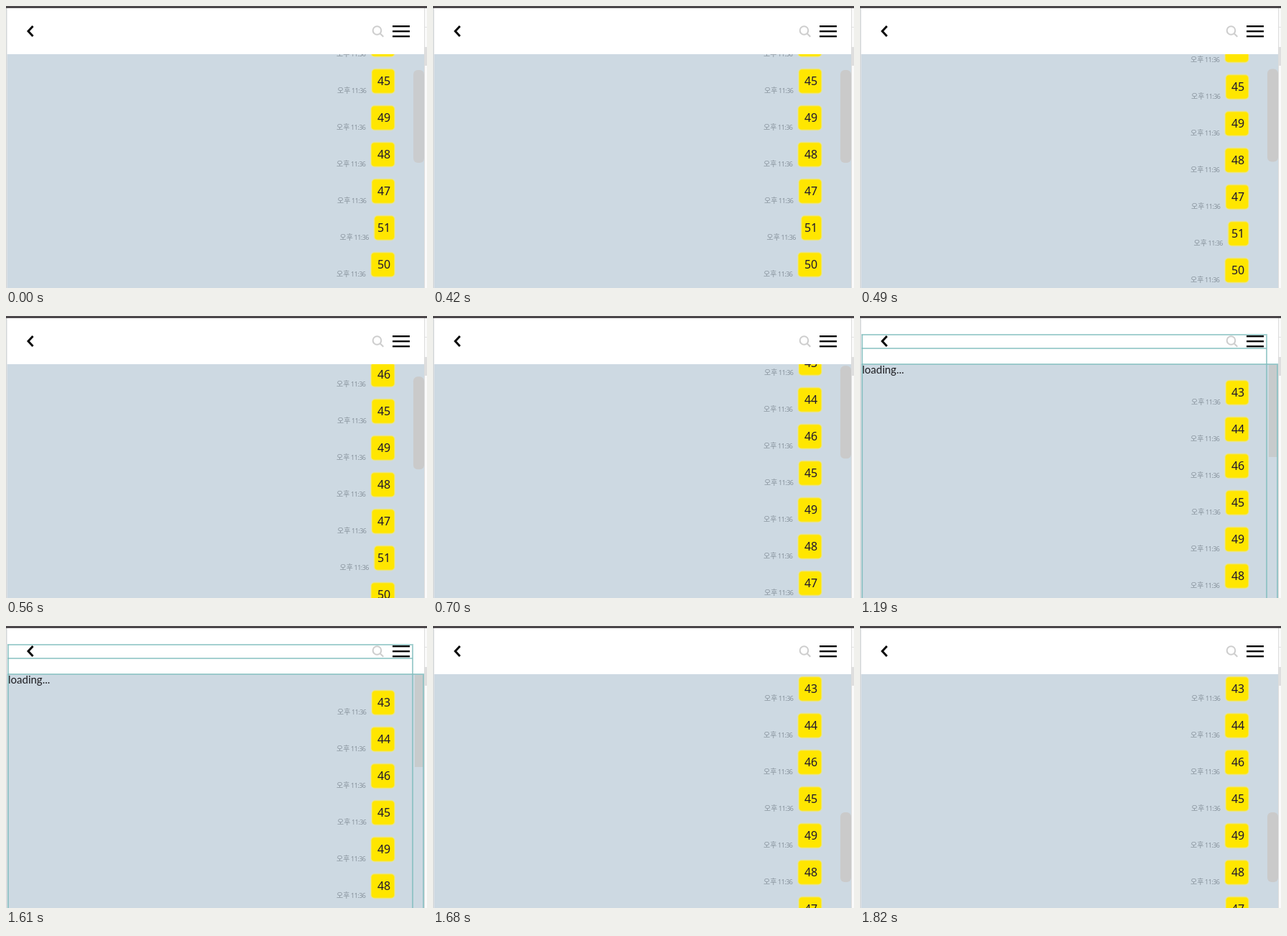
An HTML page with a canvas for the animation above (2730 ms loop, 586 px wide and 392 px high).

```html
<!DOCTYPE html>
<html lang="ko">
<head>
<meta charset="utf-8">
<title>Chat scroll</title>
<style>
html, body { margin: 0; width: 100%; height: 100%; overflow: hidden; background: #fff; }
canvas { display: block; }
</style>
</head>
<body>
<canvas id="stage" width="586" height="392"></canvas>
<script>
const c = document.getElementById('stage').getContext('2d');
const LOOP = 2730, STEP = 70, GAP = 51;
const numbers = [43, 44, 46, 45, 49, 48, 47, 51, 50];
const leftEdge = { 51: 512.5, 43: 509, 45: 509, 47: 509 };
const scroll = [8, 28, 70, 114];   // distance after each step from 490 ms

function box(color, x, y, w, h, r = 0) {
  c.fillStyle = color;
  c.beginPath();
  c.roundRect(x, y, w, h, r);
  c.fill();
}

function line(color, width, ...pts) {
  c.strokeStyle = color;
  c.lineWidth = width;
  c.beginPath();
  for (let i = 0; i < pts.length; i += 2) c.lineTo(pts[i], pts[i + 1]);
  c.stroke();
}

function text(str, font, color, x, y, align = 'right', spacing = '0px') {
  c.font = font;
  c.fillStyle = color;
  c.textAlign = align;
  c.letterSpacing = spacing;
  c.fillText(str, x, y);
}

function message(n, y) {
  const x = leftEdge[n] || 508;
  box('rgba(240,232,120,.4)', x - 1, y - 17.5, 543 - x, 36, 6);
  box('rgba(255,232,40,.7)', x, y - 16.5, 541 - x, 34, 5);
  box('#ffe600', x + 1, y - 15.5, 539 - x, 32, 4);
  text(n, '16px "Noto Sans", sans-serif', '#1e1630', 535.2, y + 5.5);
  text('오후', '10px "Noto Sans CJK KR", "Noto Sans CJK", sans-serif', '#87929c', x - 48, y + 17, 'left');
  text('11:36', '9px "Noto Sans", sans-serif', '#87929c', x - 7.5, y + 17, 'right', '-0.5px');
}

function chrome() {
  box('#fff', 2, 3, 580, 64);
  box('#4b474a', 0, 0, 586, 3);
  box('#d3d6d8', 0, 3, 1.5, 389);
  box('#fafafa', 582, 3, 4, 389);
  box('#dcdcdc', 582, 3, 1, 389);
  box('#e2e2e2', 583, 29, 3, 1);
  box('#dedede', 583, 57, 3, 26);
  line('#0a0a0a', 3, 37.5, 28, 31, 35, 37.5, 42);
  c.strokeStyle = '#cdcdcd';
  c.lineWidth = 2;
  c.beginPath();
  c.arc(516.5, 34, 5.8, 0, 7);
  c.stroke();
  line('#cdcdcd', 2, 520.5, 38, 525.3, 42.7);
  for (const y of [27, 34, 41]) box('#0a0a0a', 538, y, 24, 2.4);
}

function layerBorders() {
  const teal = 'rgba(130,190,190,.72)';
  line(teal, 2, 2, 26, 566, 26, 566, 392);
  line(teal, 2, 2, 45, 566, 45);
  line(teal, 2, 2, 67, 581, 67, 581, 392);
  line(teal, 2, 3, 26, 3, 392);
}

function draw(t) {
  const loading = t >= 770 && t < 1680, done = t >= 1680;
  const moved = t < 490 ? 0 : scroll[Math.min(3, Math.floor((t - 490) / STEP))];
  const top = done ? 87 : loading ? 106 : moved - 49;

  box('#fff', 0, 0, 586, 392);
  box('#cdd9e2', 1.5, 67, 580.5, 325);
  numbers.forEach((n, i) => message(n, top + i * GAP));
  if (loading) {
    text('loading...', '15px Lato, sans-serif', '#1c1c20', 3, 80, 'left');
    box('#c7cbcc', 569, 68, 12, 128);
  } else {
    c.globalAlpha = Math.min(1, 0.85 + 0.15 * Math.floor(t / STEP) / 4);
    box('#cacaca', 567, done ? 259 : 89 - moved / 5.8, 15, done ? 97 : 129, 6);
    c.globalAlpha = 1;
  }
  chrome();
  if (loading) layerBorders();
}

function frame(now) {
  draw(now % LOOP);
  requestAnimationFrame(frame);
}
draw(0);
requestAnimationFrame(frame);
</script>
</body>
</html>
```
